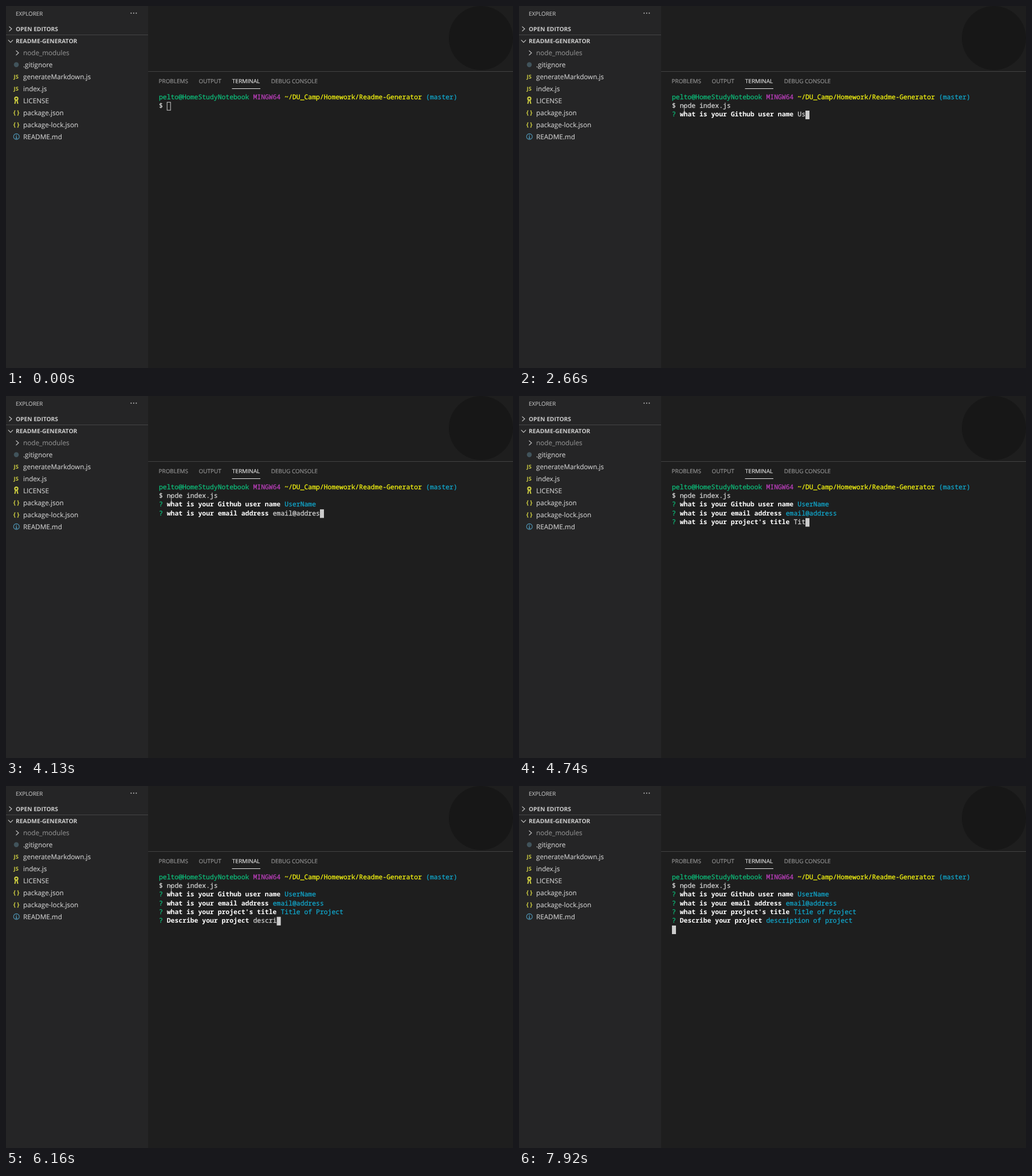
These frames come from a looping animation (885x633 px, 7990 ms). An HTML page:

```html
<!DOCTYPE html>
<html lang="en">
<head>
<meta charset="utf-8">
<title>Readme generator session</title>
<style>
  html, body { margin: 0; width: 100%; height: 100%; overflow: hidden; background: #1e1e1e; }
  svg { display: block; width: 885px; height: 633px; }
  text {
    font-family: 'Open Sans', 'Noto Sans', sans-serif; white-space: pre; text-rendering: geometricPrecision;
    fill: currentColor; stroke: currentColor; stroke-width: 0.15;
  }
  .mono { font-family: 'Noto Sans Mono', 'DejaVu Sans Mono', monospace; font-size: 11.42px; stroke-width: 0.28; }
  .bold { font-weight: 700; stroke-width: 0; }
  .line { fill: none; stroke: #c5c5c5; stroke-width: 1.1; }
</style>
</head>
<body>
<svg id="stage" viewBox="0 0 885 633" xmlns="http://www.w3.org/2000/svg"></svg>
<script>
const LOOP = 7990;
const LEFT = 267, TOP = 152.5, COL = 6.854, ROW = 15.25;
const GREY = '#ccc', PLAIN = '#d4d4d4', GOLD = '#cbcb41', BLUE = '#519aba';
const GREEN = '#0dbc79', CYAN = '#11a8cd', YELLOW = '#f5f510', MAGENTA = '#bc3fbc';
const stage = document.getElementById('stage');

function add(tag, attrs, content = '') {
  const node = document.createElementNS('http://www.w3.org/2000/svg', tag);
  for (const key in attrs) node.setAttribute(key, attrs[key]);
  node.textContent = content;
  return stage.appendChild(node);
}
const rect = (x, y, width, height, fill) => add('rect', { x, y, width, height, fill });
const label = (x, y, size, str, color = GREY, cls = '') =>
  add('text', { x, y, 'font-size': size, color, class: cls }, str);
const line = d => add('path', { d, class: 'line' });
const colX = col => LEFT + col * COL;
const rowY = row => TOP + row * ROW;
const mono = (col, row, str, color, cls = '') =>
  add('text', { x: colX(col), y: Math.round(rowY(row) + 10.3), color, class: 'mono ' + cls }, str);

function drawSidebar() {
  rect(0, 0, 248, 633, '#252526');
  label(17, 16.6, 9.9, 'EXPLORER', '#bbb');
  for (const x of [218.4, 222.9, 227.4]) add('circle', { cx: x, cy: 12.6, r: 1, fill: '#c5c5c5' });
  line('M5.5 36 L10 40 L5.5 44');
  label(17, 44, 10.2, 'OPEN EDITORS', GREY, 'bold');
  rect(0, 50, 248, 1, '#464647');
  line('M3.8 59.3 L8 63.6 L12.2 59.3');
  label(17, 65, 10.3, 'README-GENERATOR', GREY, 'bold');

  const files = ['node_modules', '.gitignore', 'generateMarkdown.js', 'index.js',
    'LICENSE', 'package.json', 'package-lock.json', 'README.md'];
  files.forEach((name, i) => {
    const y = 86 + i * 21;
    label(30, y, 11.7, name, i ? GREY : '#8c8c8c');
    if (name.endsWith('.js')) label(13.6, y - 1, 9.3, 'JS', GOLD, 'bold');
    if (name.endsWith('.json')) {
      label(12.8, y - 0.8, 10.5, '{', GOLD, 'bold');
      label(19.2, y - 0.8, 10.5, '}', GOLD, 'bold');
    }
  });
  line('M17.5 78 L22 82 L17.5 86');
  add('circle', { cx: 18, cy: 102.6, r: 4.3, fill: '#41535b' });

  // key
  add('circle', { cx: 18, cy: 162, r: 2.6, fill: 'none', stroke: GOLD, 'stroke-width': 2.2 });
  add('path', { d: 'M17 164 L15.4 171 M19 164 L20.6 171', stroke: GOLD, 'stroke-width': 2 });

  // info
  add('circle', { cx: 18.2, cy: 228.4, r: 5, fill: 'none', stroke: BLUE, 'stroke-width': 1.1 });
  add('path', { d: 'M18.2 225 v1.6 M17 228 h1.2 v3.4 M16.8 231.4 h2.8', fill: 'none', stroke: BLUE, 'stroke-width': 1.2 });
}

function drawPanel() {
  add('circle', { cx: 829, cy: 56, r: 56, fill: '#171717' });
  rect(248, 114, 637, 1, '#424242');
  label(266.5, 135.2, 9.95, 'PROBLEMS', '#979797');
  label(336.5, 135.2, 9.95, 'OUTPUT', '#979797');
  label(394.7, 135.2, 10.1, 'TERMINAL', '#e7e7e7');
  label(462.7, 135.2, 9.95, 'DEBUG CONSOLE', '#979797');
  rect(394.5, 144, 49.5, 1, '#e7e7e7');

  mono(0, 0, 'pelto@HomeStudyNotebook', GREEN);
  mono(24, 0, 'MINGW64', MAGENTA);
  mono(32, 0, '~/DU_Camp/Homework/Readme-Generator', YELLOW);
  mono(68, 0, '(master)', CYAN);
}

// keys: [time, characters typed]
const lines = [
  { mark: '$', ask: '', reply: 'node index.js', show: 0, end: 2260,
    keys: [[1690, 0], [2200, 13]] },
  { mark: '?', ask: 'what is your Github user name', reply: 'UserName', show: 2420, end: 3210,
    keys: [[2530, 0], [2650, 2], [3080, 8]] },
  { mark: '?', ask: 'what is your email address', reply: 'email@address', show: 3210, end: 4340,
    keys: [[3360, 0], [4100, 12], [4200, 13]] },
  { mark: '?', ask: "what is your project's title", reply: 'Title of Project', show: 4340, end: 5640,
    keys: [[4500, 0], [5460, 15], [5540, 16]] },
  { mark: '?', ask: 'Describe your project', reply: 'description of project', show: 5640, end: 7580,
    keys: [[5700, 0], [5780, 1], [6600, 12], [6900, 15], [7450, 22]] }
];

const mousePath = [[80, 716, 573], [840, 289, 180], [960, 311, 181], [1090, 278, 179], [1230, 289, 180]];
const FOCUS = 1160;

// Values of a list of [time, ...values] stops at time t
function track(stops, t, ease = u => u) {
  if (t <= stops[0][0]) return stops[0].slice(1);
  const i = stops.findIndex(s => s[0] > t);
  if (i < 0) return stops[stops.length - 1].slice(1);
  const a = stops[i - 1], b = stops[i];
  const u = ease((t - a[0]) / (b[0] - a[0]));
  return a.slice(1).map((v, k) => v + (b[k + 1] - v) * u);
}
const smooth = u => u * u * (3 - 2 * u);

drawSidebar();
drawPanel();
lines.forEach((l, i) => {
  l.row = i + 1;
  l.col = l.ask ? l.ask.length + 3 : 2;
  l.nodes = [
    mono(0, l.row, l.mark, l.ask ? GREEN : PLAIN),
    mono(2, l.row, l.ask, '#fff', 'bold')
  ];
  l.answer = mono(l.col, l.row, '', PLAIN);
});
const caret = add('rect', { width: 6, height: 14, stroke: GREY, 'stroke-width': 1 });
const mouse = add('path', { d: 'M-2 -5.5 H2 M0 -5.5 V5.5 M-2 5.5 H2', stroke: GREY, 'stroke-width': 0.9 });

function render(t) {
  let row = 1, col = 2;
  for (const l of lines) {
    const shown = t >= l.show, done = t >= l.end;
    const count = Math.floor(track(l.keys, t)[0] + 1e-6);
    for (const n of l.nodes) n.style.display = shown ? '' : 'none';
    l.answer.textContent = shown ? l.reply.slice(0, count) : '';
    l.answer.setAttribute('color', l.ask && done ? CYAN : PLAIN);
    if (shown) [row, col] = done ? [l.row + 1, 0] : [l.row, l.col + count];
  }
  caret.setAttribute('x', colX(col) + 0.5);
  caret.setAttribute('y', rowY(row) + 0.5);
  caret.setAttribute('fill', t < FOCUS ? 'none' : GREY);

  const [x, y] = track(mousePath, t, smooth);
  mouse.setAttribute('transform', `translate(${Math.round(x) - 0.5} ${Math.round(y)})`);
  mouse.style.display = t < 80 ? 'none' : '';
}

const start = performance.now();
function tick() {
  render((performance.now() - start) % LOOP);
  requestAnimationFrame(tick);
}
tick();
</script>
</body>
</html>
```
